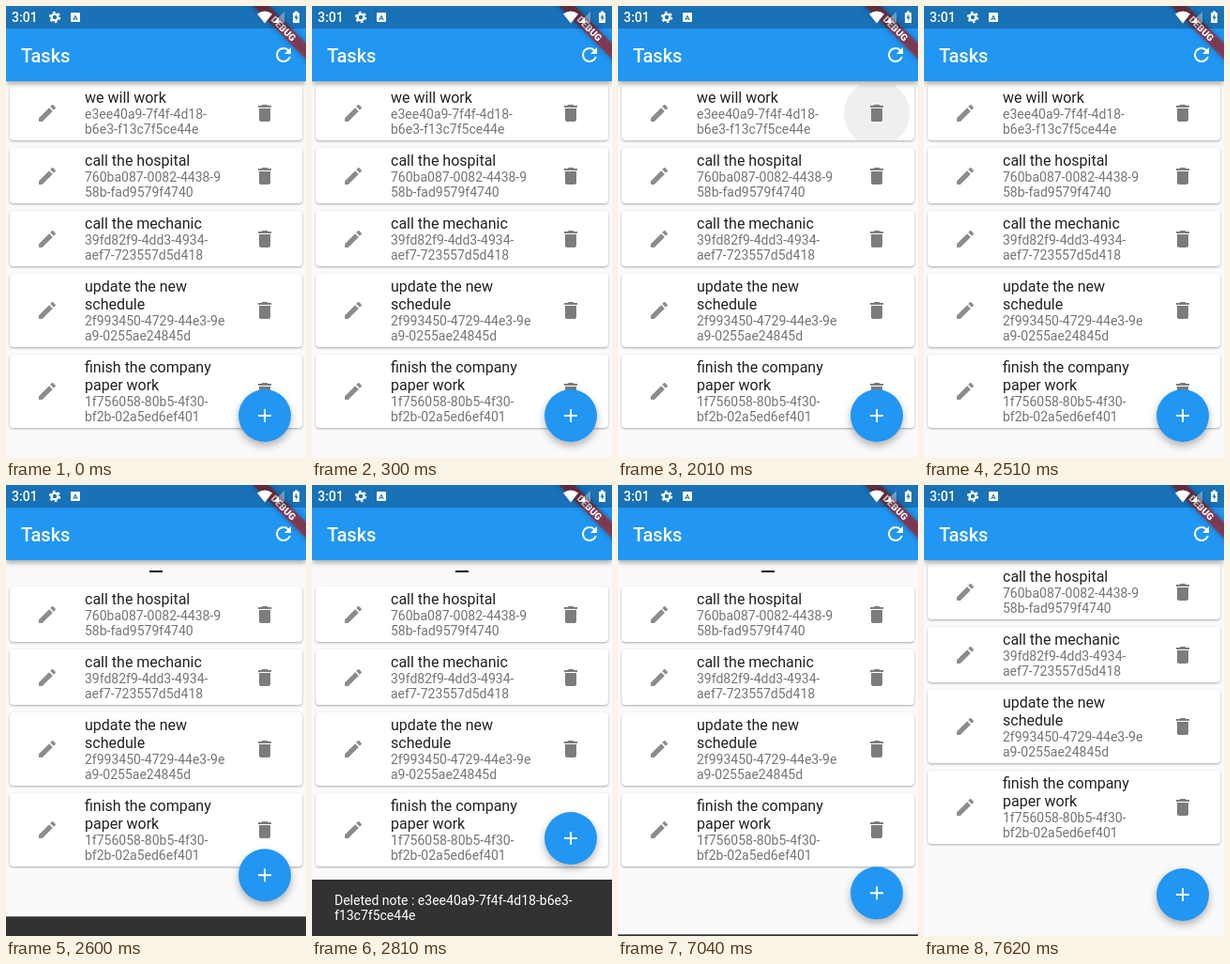
Animation of 320x480 px, one loop 8.16 s. Source, as an HTML page:

```html
<!DOCTYPE html>
<html lang="en">
<head>
<meta charset="utf-8">
<title>Tasks</title>
<style>
  html, body { margin: 0; width: 100%; height: 100%; overflow: hidden; background: #fafafa; }
  svg { display: block; width: 320px; height: 480px; font-family: Roboto, "Noto Sans", sans-serif; }
  text { white-space: pre; }
  .title { font-size: 16px; fill: #212121; }
  .sub { font-size: 14px; fill: #757575; }
  .edit { fill: #8c8c8c; }
  .trash { fill: #7c7c7c; }
  .card { fill: #fff; filter: drop-shadow(0 1px 1px rgba(0, 0, 0, .32)); }
  .bar { fill: #2196f3; filter: drop-shadow(0 2px 3px rgba(0, 0, 0, .4)); }
  .fab { fill: #2196f3; filter: drop-shadow(0 4px 4px rgba(0, 0, 0, .3)); }
  .banner { fill: #b71c1c; fill-opacity: .63; filter: drop-shadow(0 0 3px rgba(0, 0, 0, .5)); }
  .snack { font-size: 14px; fill: #fff; }
</style>
</head>
<body>
<svg viewBox="0 0 320 480">
  <defs>
    <path id="edit" d="M3 17.25V21h3.75L17.81 9.94l-3.75-3.75L3 17.25zM20.71 7.04a1 1 0 0 0 0-1.41l-2.34-2.34a1 1 0 0 0-1.41 0l-1.83 1.83 3.75 3.75 1.83-1.83z"/>
    <path id="trash" d="M6 19c0 1.1.9 2 2 2h8c1.1 0 2-.9 2-2V7H6v12zM19 4h-3.5l-1-1h-5l-1 1H5v2h14V4z"/>
    <clipPath id="firstCard"><rect x="4" y="84" width="312" height="59" rx="4"/></clipPath>
  </defs>
  <rect width="320" height="480" fill="#fafafa"/>
  <g id="list"></g>
  <g id="ink" clip-path="url(#firstCard)">
    <circle id="highlight" cx="276" cy="114" r="35" fill="#bcbcbc"/>
    <circle id="splash" cx="276" cy="114" fill="#c8c8c8"/>
    <use href="#trash" x="264" y="102" class="trash"/>
  </g>
  <rect id="dash" x="153" y="91" width="14" height="2" fill="#111"/>

  <rect class="bar" width="320" height="80"/>
  <text x="16" y="60" font-size="20" font-weight="500" fill="#fff">Tasks</text>
  <path transform="translate(284 40)" fill="#fff" d="M17.65 6.35A7.96 7.96 0 0 0 12 4a8 8 0 1 0 7.73 10h-2.08A6 6 0 1 1 12 6c1.66 0 3.14.69 4.22 1.78L13 11h7V4l-2.35 2.35z"/>

  <g transform="translate(320 0) rotate(45)">
    <rect class="banner" x="-60" y="28" width="120" height="12"/>
    <text y="37.6" font-size="10.2" font-weight="900" fill="#fff" text-anchor="middle">DEBUG</text>
  </g>

  <rect width="320" height="24" fill-opacity=".25"/>
  <g fill="#fff">
    <text x="6" y="17" font-size="14" font-weight="500">3:01</text>
    <circle cx="52" cy="12" r="3.4" fill="none" stroke="#fff" stroke-width="2.4"/>
    <circle cx="52" cy="12" r="5.3" fill="none" stroke="#fff" stroke-width="1.8" stroke-dasharray="2.6 2.95"/>
    <rect x="69" y="7" width="10" height="10" rx="1"/>
    <text x="74" y="15" font-size="8" font-weight="700" text-anchor="middle" fill="#1971b6">A</text>
    <path d="M268 8.5Q276 2.5 284 8.5L276 18.5Z"/>
    <path d="M297 6V18H285Z" opacity=".35"/>
    <path d="M291 12V18H285Z"/>
    <path d="M308 5.5h3V7h2v11h-7V7h2z"/>
    <path d="M310 8.5l-2.4 4.3h1.6V16l2.5-4.5h-1.7z" fill="#1971b6"/>
  </g>

  <g id="fab">
    <circle class="fab" cx="276" cy="436" r="28"/>
    <path d="M269 436h14M276 429v14" stroke="#fff" stroke-width="2"/>
  </g>
  <g id="snackbar">
    <rect y="480" width="320" height="60" fill="#323232"/>
    <g id="message" class="snack">
      <text x="24" y="507">Deleted note : e3ee40a9-7f4f-4d18-b6e3-</text>
      <text x="24" y="523">f13c7f5ce44e</text>
    </g>
  </g>
</svg>
<script>
const LOOP = 8160;
const PRESS = 1890, RELEASE = 2300, DELETED = 2520, RELOADED = 7620;
const SNACK_IN = 2528, SNACK_OUT = 6817, SNACK_TIME = 250, SNACK_HEIGHT = 60;

const tasks = [
  [["we will work"], ["e3ee40a9-7f4f-4d18-", "b6e3-f13c7f5ce44e"]],
  [["call the hospital"], ["760ba087-0082-4438-9", "58b-fad9579f4740"]],
  [["call the mechanic"], ["39fd82f9-4dd3-4934-", "aef7-723557d5d418"]],
  [["update the new", "schedule"], ["2f993450-4729-44e3-9e", "a9-0255ae24845d"]],
  [["finish the company", "paper work"], ["1f756058-80b5-4f30-", "bf2b-02a5ed6ef401"]]
];

const $ = id => document.getElementById(id);
const clamp = v => Math.min(1, Math.max(0, v));
const set = (id, name, value) => $(id).setAttribute(name, value);
const show = (id, on) => set(id, "visibility", on ? "visible" : "hidden");
const line = (cls, y, s) => `<text class="${cls}" x="84" y="${y}">${s}</text>`;
const icon = (name, x, y) => `<use href="#${name}" class="${name}" x="${x}" y="${y}"/>`;

function card([title, sub], y) {
  const titleHeight = title.length * 19;
  const height = 8 + titleHeight + sub.length * 16;
  const iconY = Math.round(y + height / 2) - 12;
  return {
    height,
    html: `<rect class="card" x="4" y="${y}" width="312" height="${height}" rx="4"/>` +
      title.map((s, i) => line("title", y + 19 + i * 19, s)).join("") +
      sub.map((s, i) => line("sub", y + 17 + titleHeight + i * 16, s)).join("") +
      icon("edit", 32, iconY) + icon("trash", 264, iconY)
  };
}

let cardY = 84;
$("list").innerHTML = tasks.map((task, i) => {
  const { height, html } = card(task, cardY);
  cardY += height + 8;
  return `<g${i ? "" : ' id="first"'}>${html}</g>`;
}).join("");

// Cubic Bezier (.4, 0, .2, 1), solved for y at a given x.
function fastOutSlowIn(x) {
  let lo = 0, hi = 1;
  for (let i = 0; i < 24; i++) {
    const s = (lo + hi) / 2, r = 1 - s;
    if (1.2 * r * r * s + 0.6 * r * s * s + s ** 3 < x) lo = s; else hi = s;
  }
  return lo * lo * (3 - 2 * lo);
}

function render(t) {
  const deleted = t >= DELETED, reloaded = t >= RELOADED;
  set("list", "transform", `translate(0 ${reloaded ? -67 : deleted ? -43 : 0})`);
  show("first", !deleted);
  show("dash", deleted && !reloaded);

  const fade = 1 - clamp((t - RELEASE) / 200);
  show("ink", t >= PRESS && fade > 0);
  set("highlight", "opacity", 0.4 * clamp((t - PRESS) / 200) * fade);
  const grown = clamp((Math.min(t, RELEASE) - PRESS) / 1000) * 35 + Math.max(0, t - RELEASE);
  set("splash", "r", Math.min(35, grown));
  set("splash", "opacity", 0.4 * fade);

  const entering = clamp((t - SNACK_IN) / SNACK_TIME);
  const progress = t < SNACK_OUT ? entering : 1 - clamp((t - SNACK_OUT) / SNACK_TIME);
  const lift = SNACK_HEIGHT * fastOutSlowIn(progress);
  set("snackbar", "transform", `translate(0 ${-lift})`);
  set("fab", "transform", `translate(0 ${-lift})`);
  set("message", "opacity", fastOutSlowIn(clamp((entering - 0.72) / 0.28)));
  show("snackbar", progress > 0);
}

const start = performance.now();
function tick() {
  render((performance.now() - start) % LOOP);
  requestAnimationFrame(tick);
}
tick();
</script>
</body>
</html>
```
